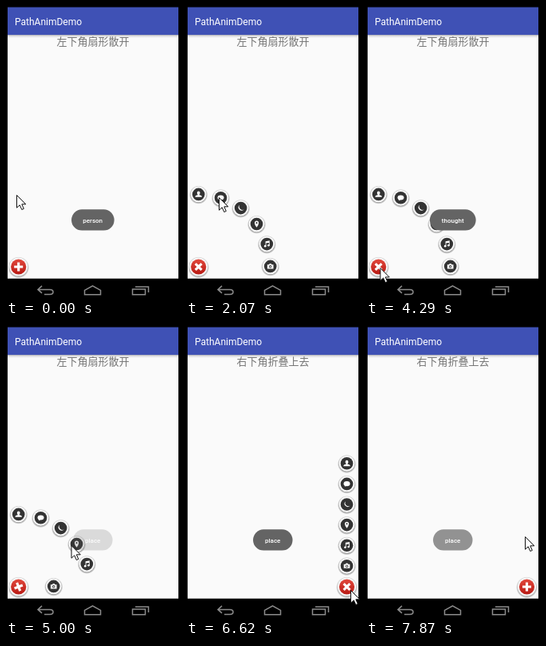
An HTML page that plays this animation: 218 px wide and 365 px high, repeating every 7.99 s.

```html
<!DOCTYPE html>
<html lang="zh">
<head>
<meta charset="utf-8">
<title>PathAnimDemo</title>
<style>
html, body { margin: 0; width: 100%; height: 100%; overflow: hidden; background: #000; }
svg { display: block; width: 100vw; height: 100vh; }
text { font-family: Roboto, sans-serif; }
#title { font-family: "Noto Sans CJK SC", "Noto Sans CJK", sans-serif; }
</style>
</head>
<body>
<svg viewBox="0 0 218 365" preserveAspectRatio="none">
  <defs>
    <linearGradient id="shade" x2="0" y2="1">
      <stop offset="0" stop-color="#a9a9b0"/>
      <stop offset=".4" stop-color="#dedee1"/>
      <stop offset="1" stop-color="#fafafa"/>
    </linearGradient>
    <linearGradient id="red" x2="0" y2="1">
      <stop offset="0" stop-color="#e2483c"/>
      <stop offset="1" stop-color="#b81a14"/>
    </linearGradient>
    <radialGradient id="halo">
      <stop offset=".75" stop-color="#000" stop-opacity=".5"/>
      <stop offset="1" stop-color="#000" stop-opacity="0"/>
    </radialGradient>
  </defs>
  <rect width="218" height="365"/>
  <rect x="2" y="2" width="214" height="338.700" fill="#fafafa"/>
  <rect x="2" y="1.500" width="214" height="34.500" fill="#3f51b5"/>
  <rect x="2" y="36" width="214" height="4" fill="url(#shade)"/>
  <text x="11" y="24.300" font-size="12" fill="#fff">PathAnimDemo</text>
  <text id="title" x="109" y="49.300" font-size="13" text-anchor="middle" fill="#757575"></text>
  <g fill="none" stroke="#8c8c8c" stroke-width="1.5" transform="translate(0 .4)">
    <path d="M45 349.5L40 354L45 358.500M40.500 354H55Q59 354 59 357Q59 360 55 360H48"/>
    <path d="M98.500 355L108.500 349.500L118.500 355V360.300H98.500Z"/>
    <path d="M158.500 353.500H174.500V360.300H158.500ZM162 350.500H178.500V357.500"/>
  </g>
  <g id="items"></g>
  <g id="button">
    <circle cy=".8" r="13.4" fill="url(#halo)"/>
    <circle r="11.6" fill="#f6f6f6"/>
    <circle r="9.6" fill="url(#red)"/>
    <path id="cross" d="M-5.500 0H5.500M0 -5.500V5.500" stroke="#fff" stroke-width="3.100"/>
  </g>
  <g id="toast">
    <rect id="pill" y="254.300" height="26.200" rx="13.100" fill="#646464"/>
    <text id="label" x="108.700" y="270.700" font-size="8" font-weight="500" text-anchor="middle" fill="#fff"></text>
  </g>
  <path id="cursor" d="M.5 .5V16.200L4.200 12.800L6.800 18.500L9.300 17.400L6.800 11.800H11.800Z" fill="#fff" stroke="#111"/>
</svg>
<script>
const $ = id => document.getElementById(id);
const LOOP = 7990, SWITCH = 5540;  // ms; at SWITCH the right-hand menu page appears
const TRAVEL = 480, DWELL = 250;   // cursor glide, pause before a click
const FADE = 220, HOLD = 2155;     // toast timing

// where the cursor stops; each click toggles the menu, and one on an item shows a toast
const stops = [
  { at: -1000, x: 13, y: 236, click: true, toast: "person" },
  { at: 1068, x: 20, y: 321, click: true },
  { at: 2325, x: 41, y: 239, click: true, toast: "thought" },
  { at: 3471, x: 14, y: 330, click: true },
  { at: 4955, x: 81.5, y: 274, click: true, toast: "place" },
  { at: 5935, x: 154, y: 311 },
  { at: 6465, x: 206, y: 330, click: true },
  { at: 7720, x: 199, y: 263, click: true, toast: "place" }
];
const clicks = stops.filter(s => s.click);

const dark = "#333";
const icons = {
  camera: `<path d="M-4.500 -2.500H-2L-1 -4H1L2 -2.500H4.500V3.500H-4.500Z"/>
    <circle cy=".4" r="2" fill="${dark}"/><circle cy=".4" r="1"/>`,
  music: `<path d="M-2 -4L4 -5V2H3V-2L-1 -1.500V3H-2Z"/>
    <circle cx="-2.500" cy="3" r="1.500"/><circle cx="2.500" cy="2" r="1.500"/>`,
  place: `<path d="M0 5Q-3 1 -3 -1.600A3 3 0 0 1 3 -1.600Q3 1 0 5Z"/><circle cy="-1.600" r="1.200" fill="${dark}"/>`,
  moon: `<path d="M-2 -4.500A4.700 4.700 0 1 0 4.600 2.200A5 5 0 0 1 -2 -4.500Z"/>`,
  thought: `<ellipse cy="-.3" rx="4.700" ry="3.600"/><path d="M-3 1L-3 4L0 2.500Z"/>`,
  person: `<ellipse cy="-2" rx="2.200" ry="2.700"/><path d="M-1 0H1V1Q5 1.500 5 4H-5Q-5 1.500 -1 1Z"/>`
};
$("items").innerHTML = Object.values(icons).map(icon => `<g><circle cy=".7" r="11.600" fill="url(#halo)"/>
  <circle r="9.900" fill="#f8f8f8"/><circle r="7.800" fill="${dark}"/>
  <g fill="#fff" transform="scale(.85)">${icon}</g></g>`).join("");
const items = [...$("items").children];

const clamp = v => Math.min(1, Math.max(0, v));
const smooth = u => u * u * (3 - 2 * u);
const overshoot = u => 1 + (u - 1) ** 2 * (2 * (u - 1) + 1);
const place = (el, x, y) => el.setAttribute("transform", `translate(${x} ${y})`);

function drawMenu(t) {
  const right = t >= SWITCH;
  const past = clicks.filter(c => c.at <= t);
  const open = past.length % 2 === 0, age = t - past.at(-1).at;
  const x0 = right ? 201.5 : 15.7, y0 = 326, gap = right ? 10 : 50;
  items.forEach((el, i) => {
    const u = clamp((age - i * gap) / 90);
    const p = open ? overshoot(u) : 1 - u;
    const angle = i * Math.PI / 10;
    const dx = right ? 0 : 90 * Math.cos(angle);
    const dy = right ? 25.6 * (i + 1) : 90 * Math.sin(angle);
    place(el, x0 + dx * p, y0 - .6 - dy * p);
    el.style.display = p > .001 ? "" : "none";
  });
  const turn = 1 - (1 - clamp(age / 150)) ** 2;
  place($("button"), x0, y0);
  $("cross").setAttribute("transform", `rotate(${-45 * (open ? turn : 1 - turn)})`);
  $("title").textContent = right ? "右下角折叠上去" : "左下角扇形散开";
}

function drawToast(t) {
  const { toast, at } = clicks.filter(c => c.toast && c.at <= t).pop();
  const width = 29 + 4.1 * toast.length, age = t - at;
  $("label").textContent = toast;
  $("pill").setAttribute("width", width);
  $("pill").setAttribute("x", 108.8 - width / 2);
  $("toast").setAttribute("opacity", Math.min(clamp(age / FADE), 1 - clamp((age - HOLD) / FADE)));
}

function drawCursor(t) {
  let { x, y } = stops[0];
  for (const s of stops) {
    const e = smooth(clamp((t - s.at + DWELL + TRAVEL) / TRAVEL));
    x += (s.x - x) * e;
    y += (s.y - y) * e;
  }
  place($("cursor"), x, y);
}

const begin = performance.now();
function loop() {
  const t = (performance.now() - begin) % LOOP;
  drawMenu(t);
  drawToast(t);
  drawCursor(t);
  requestAnimationFrame(loop);
}
loop();
</script>
</body>
</html>
```
